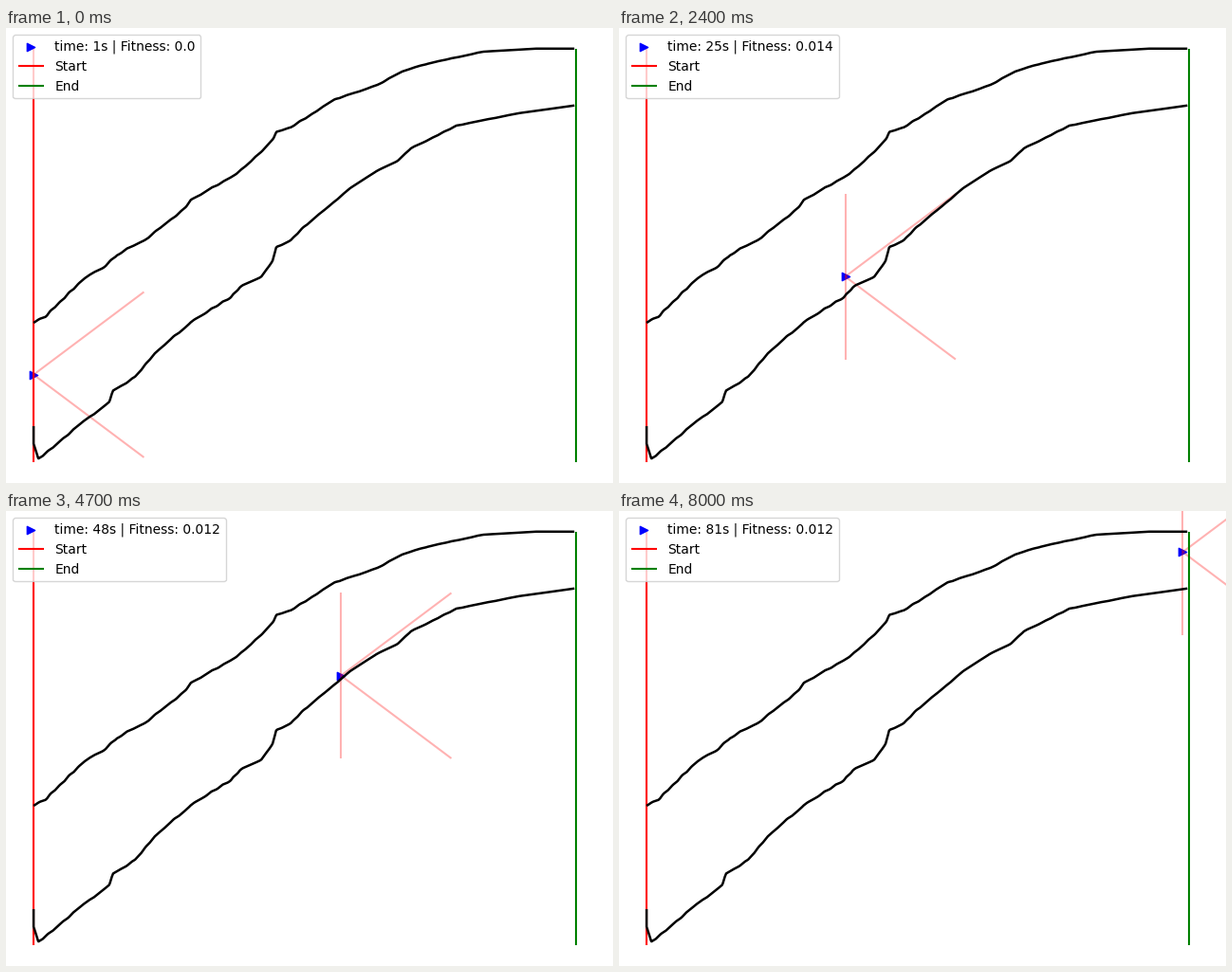
A matplotlib script that plays this animation: 640x480 px, repeating every 8100 ms.

```python
import numpy as np
import matplotlib.pyplot as plt
from matplotlib.animation import FuncAnimation

W, H = 640, 480
FRAMES, INTERVAL = 81, 100
LEFT, RIGHT, TOP, BOTTOM = W / 22, 601, H / 22, H - H / 22
UNIT_X, UNIT_Y = W / 5.5, H / 5.5

# Main bends of each wall; the fine roughness is added by wall().
UPPER_BENDS = [
    (LEFT, 310), (43, 303), (82, 264), (103, 252), (117, 239), (150, 221),
    (190, 189), (195, 181), (243, 154), (270, 130), (282, 117), (285, 109),
    (300, 105), (347, 75), (392, 60), (418, 45.5), (445, 37.5), (503, 25),
    (558, 21.8), (RIGHT, 21.8),
]
LOWER_BENDS = [
    (LEFT, 420), (LEFT, 438), (34, 455), (82, 415), (109, 394), (113, 383),
    (136, 368), (157, 343), (195, 310), (237, 284), (247, 273), (269, 262),
    (281, 246), (285, 231), (300, 224), (315, 209), (363, 169), (391, 150.5),
    (413, 140), (427, 127), (475, 103), (540, 90), (RIGHT, 81.5),
]

# Step number, x, y: full speed in the open, slower along the lower wall.
ROUTE = np.array([
    (0, LEFT, 365.7), (29, 282.2, 240.7), (34, 285.5, 220), (38, 316.3, 202.5),
    (55, 386, 148.1), (63, 446.3, 112), (80, 594.4, 43.3),
])

# Sensor tips relative to the car.
SENSORS = [(0, -UNIT_Y), (0, UNIT_Y), (UNIT_X, -UNIT_Y), (UNIT_X, UNIT_Y)]


def wall(bends, rng):
    """Follow the bends with a roughness that fades out to the right."""
    xs, ys = np.array(bends).T
    travelled = np.append(0, np.cumsum(np.hypot(np.diff(xs), np.diff(ys))))
    t = np.arange(0, travelled[-1], 2)
    knots = np.arange(0, travelled[-1] + 7, 7)
    rough = np.interp(t, knots, rng.uniform(-1.2, 1.2, len(knots)))
    x = np.interp(t, travelled, xs)
    return x, np.interp(t, travelled, ys) + rough * (1 - x / RIGHT)


def position(step):
    steps, xs, ys = ROUTE.T
    return np.interp(step, steps, xs), np.interp(step, steps, ys)


def fitness(x, seconds):
    return round(float((x - LEFT) / (5 * UNIT_X) / seconds), 3)


plt.rcParams["lines.solid_capstyle"] = "butt"
fig = plt.figure(figsize=(W / 100, H / 100), dpi=100, facecolor="white")
ax = fig.add_axes([0, 0, 1, 1])
ax.set_xlim(0, W)
ax.set_ylim(H, 0)
ax.axis("off")

car = ax.scatter([LEFT], [366], marker=">", color="blue")
sensor_lines = [ax.plot([], [], color="red", alpha=0.3)[0] for _ in SENSORS]
ax.plot([LEFT, LEFT], [TOP, BOTTOM], color="red", label="Start")
ax.plot([RIGHT, RIGHT], [TOP, BOTTOM], color="green", label="End")
rng = np.random.default_rng(4)
for bends in (UPPER_BENDS, LOWER_BENDS):
    ax.plot(*wall(bends, rng), color="black", linewidth=1.8)


def update(step):
    x, y = position(step)
    seconds = step + 1
    car.set_offsets([(x, y)])
    car.set_label(f"time: {seconds}s | Fitness: {fitness(x, seconds)}")
    for line, (dx, dy) in zip(sensor_lines, SENSORS):
        line.set_data([x, x + dx], [y, y + dy])
    ax.legend(loc="upper left")
    return []


anim = FuncAnimation(fig, update, frames=FRAMES, interval=INTERVAL,
                     repeat=True, repeat_delay=0)
plt.show()
```
